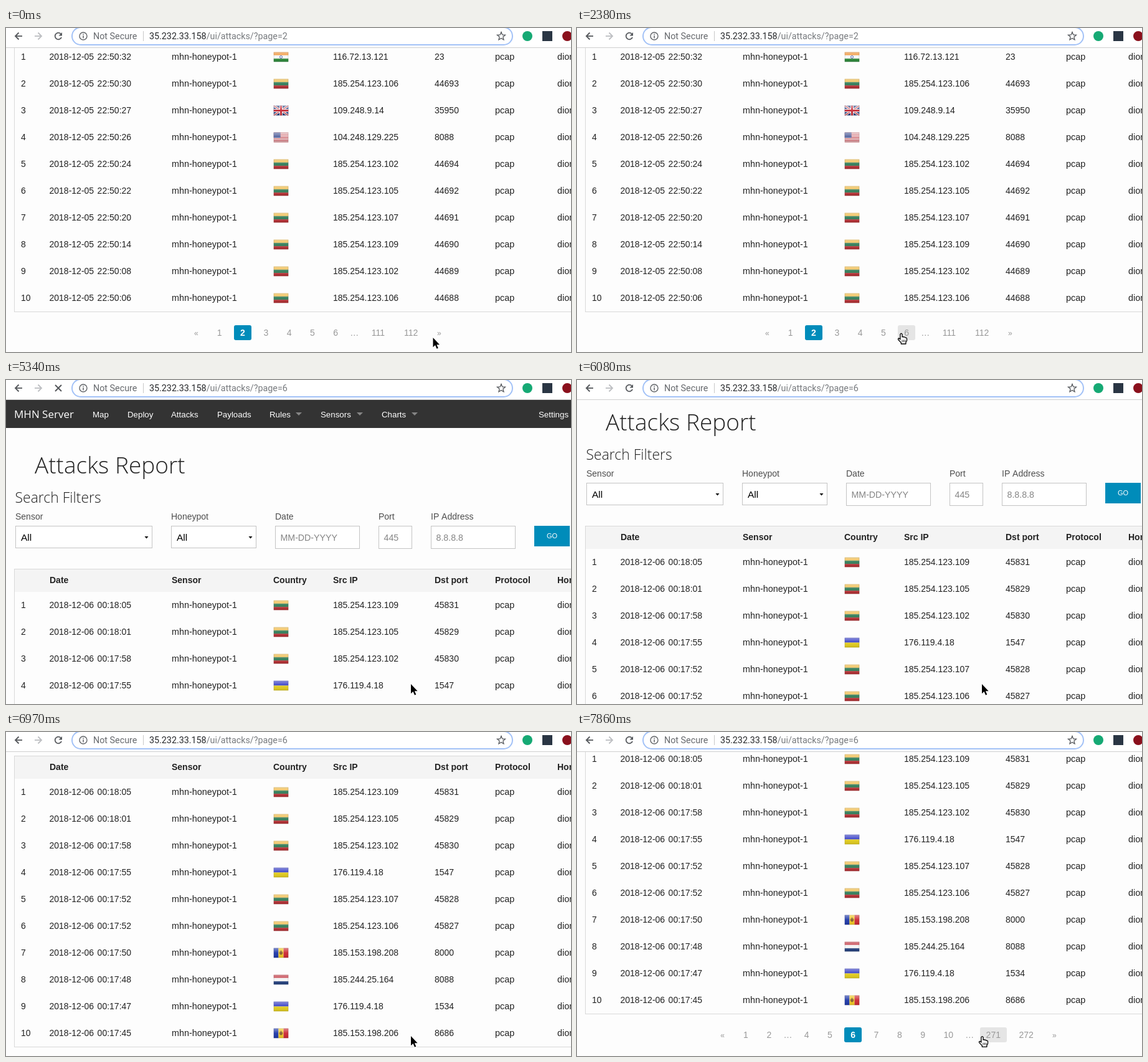
Recreate the animation shown at these times as an HTML page with a canvas. Size 907 by 520 pixels, loop 8000 ms.

```html
<!DOCTYPE html>
<html lang="en">
<head>
<meta charset="utf-8">
<title>Attacks Report</title>
<style>
html, body { margin: 0; width: 100%; height: 100%; overflow: hidden; background: #fdfdfd; }
canvas { display: block; width: 907px; height: 520px; }
</style>
</head>
<body>
<canvas id="stage"></canvas>
<script>
const W = 907, H = 520, LOOP = 8000;
const canvas = document.getElementById('stage');
const ctx = canvas.getContext('2d');
const dpr = window.devicePixelRatio || 1;
canvas.width = W * dpr;
canvas.height = H * dpr;

const SANS = '"Liberation Sans", Arial, sans-serif';
const OPEN = '"Open Sans", sans-serif';
const BAR = 'Roboto, sans-serif';
const BLUE = '#008cba';

// Each row: time, country, source address, port
const ATTACKS = {
  2: { day: '2018-12-05', hour: '22:50:', rows: [
    ['32', 'in', '116.72.13.121', '23'],
    ['30', 'lt', '185.254.123.106', '44693'],
    ['27', 'gb', '109.248.9.14', '35950'],
    ['26', 'us', '104.248.129.225', '8088'],
    ['24', 'lt', '185.254.123.102', '44694'],
    ['22', 'lt', '185.254.123.105', '44692'],
    ['20', 'lt', '185.254.123.107', '44691'],
    ['14', 'lt', '185.254.123.109', '44690'],
    ['08', 'lt', '185.254.123.102', '44689'],
    ['06', 'lt', '185.254.123.106', '44688']],
    left: 291.5, pages: '« 1 2 3 4 5 6 … 111 112 »'.split(' ') },
  6: { day: '2018-12-06', hour: '00:1', rows: [
    ['8:05', 'lt', '185.254.123.109', '45831'],
    ['8:01', 'lt', '185.254.123.105', '45829'],
    ['7:58', 'lt', '185.254.123.102', '45830'],
    ['7:55', 'ua', '176.119.4.18', '1547'],
    ['7:52', 'lt', '185.254.123.107', '45828'],
    ['7:52', 'lt', '185.254.123.106', '45827'],
    ['7:50', 'md', '185.153.198.208', '8000'],
    ['7:48', 'nl', '185.244.25.164', '8088'],
    ['7:47', 'ua', '176.119.4.18', '1534'],
    ['7:45', 'md', '185.153.198.206', '8686']],
    left: 219.8, pages: '« 1 2 … 4 5 6 7 8 9 10 … 271 272 »'.split(' ') }
};

// Step timelines: [start, value...]
const SCROLL = [[0, 315], [5340, 0], [6080, 69], [6220, 112], [6670, 132], [6820, 204],
  [6970, 265], [7110, 292], [7410, 309], [7560, 317], [7860, 318]];
const HOVER = [[0, ''], [2380, '6'], [3710, ''], [3860, '111'], [4150, ''], [4300, '112'],
  [5340, ''], [7860, '271']];
const CURSOR = [[0, 685.5, 497], [150, 691, 495], [300, 688, 500], [450, 670, 506],
  [600, 645, 511], [740, 620, 516], [890, 620, 540],
  [1190, 545, 511], [1340, 530, 498], [1480, 516, 488], [1630, 509, 487], [1780, 519, 491],
  [2380, 520.5, 490], [3420, 523, 490], [3570, 536, 490], [3710, 556, 490], [3860, 578, 487],
  [4000, 599, 485], [4150, 620, 487], [4300, 640, 487], [4440, 650, 487.5],
  [4890, 650, 488], [7860, 650.5, 488.3]];

function at(steps, t) {
  let cur = steps[0];
  for (const s of steps) if (s[0] <= t) cur = s;
  return cur;
}

function text(str, x, y, size, color, family = SANS, weight = 400, align = 'left') {
  ctx.font = `${weight} ${size}px ${family}`;
  ctx.fillStyle = color;
  ctx.textAlign = align;
  ctx.fillText(str, x, y);
}

function rect(x, y, w, h, color) {
  ctx.fillStyle = color;
  ctx.fillRect(x, y, w, h);
}

function frame(x, y, w, h, color) {
  ctx.strokeStyle = color;
  ctx.lineWidth = 1;
  ctx.strokeRect(x + 0.5, y + 0.5, w - 1, h - 1);
}

function disc(x, y, r, color) {
  ctx.fillStyle = color;
  ctx.beginPath();
  ctx.arc(x, y, r, 0, 7);
  ctx.fill();
}

function pill(x, y, w, h, color) {
  ctx.fillStyle = color;
  ctx.beginPath();
  ctx.roundRect(x, y, w, h, 3);
  ctx.fill();
}

function poly(points, color) {
  ctx.fillStyle = color;
  ctx.beginPath();
  points.forEach(([x, y]) => ctx.lineTo(x, y));
  ctx.closePath();
  ctx.fill();
}

function line(points, color, width) {
  ctx.strokeStyle = color;
  ctx.lineWidth = width;
  ctx.beginPath();
  points.forEach(([x, y], i) => i ? ctx.lineTo(x, y) : ctx.moveTo(x, y));
  ctx.stroke();
}

const caret = (x, y, r, h, color) => poly([[x - r, y], [x + r, y], [x, y + h]], color);

// Flags, drawn in a 24 x 16 box
const bands = (...colors) => colors.forEach((c, i) =>
  rect(0, i * 16 / colors.length, 24, 16 / colors.length, c));

const FLAGS = {
  lt: () => bands('#efb73e', '#2f7a55', '#b52f33'),
  nl: () => bands('#c0303c', '#f4f4f4', '#24417f'),
  ua: () => bands('#3038c4', '#e3cd1c'),
  in() {
    bands('#ee8d2c', '#f6f6f6', '#2c8a3a');
    ctx.strokeStyle = '#3c50a8';
    ctx.lineWidth = 1;
    ctx.beginPath();
    ctx.arc(12, 8, 2, 0, 7);
    ctx.stroke();
  },
  md() {
    ['#1c36a8', '#f0c820', '#cc2630'].forEach((c, i) => rect(i * 8, 0, 8, 16, c));
    disc(12, 8, 2.8, '#96692f');
    rect(11.3, 4, 1.4, 7, '#7a5526');
  },
  gb() {
    rect(0, 0, 24, 16, '#20387c');
    for (const [c, w] of [['#f2f2f2', 3.4], ['#c52b38', 1.2]]) {
      line([[0, 0], [24, 16]], c, w);
      line([[24, 0], [0, 16]], c, w);
    }
    for (const [c, w] of [['#f2f2f2', 5], ['#c52b38', 3]]) {
      rect(12 - w / 2, 0, w, 16, c);
      rect(0, 8 - w / 2, 24, w, c);
    }
  },
  us() {
    for (let i = 0; i < 13; i++) rect(0, i * 16 / 13, 24, 16 / 13, i % 2 ? '#f2eeee' : '#c4343e');
    rect(0, 0, 11, 8.6, '#33468c');
    for (let i = 0; i < 12; i++) rect(1.2 + i % 4 * 2.5, 1.2 + Math.floor(i / 4) * 2.6, 1, 1, '#c5cbe2');
  }
};

function flag(code, x, y) {
  ctx.save();
  ctx.translate(x, y);
  ctx.beginPath();
  ctx.rect(0, 0, 24, 16);
  ctx.clip();
  FLAGS[code]();
  const gloss = ctx.createLinearGradient(0, 0, 0, 16);
  gloss.addColorStop(0, 'rgba(255,255,255,.45)');
  gloss.addColorStop(0.5, 'rgba(255,255,255,.06)');
  gloss.addColorStop(1, 'rgba(0,0,0,.1)');
  rect(0, 0, 24, 16, gloss);
  frame(0, 0, 24, 16, 'rgba(0,0,0,.13)');
  ctx.restore();
}

function drawNav() {
  rect(0, 32, W, 45, '#333');
  text('MHN Server', 13, 61, 17, '#fff', OPEN);
  const items = [['Map', 139], ['Deploy', 195], ['Attacks', 265], ['Payloads', 339],
    ['Rules', 423, 470], ['Sensors', 505, 568], ['Charts', 603, 656], ['Settings', 855]];
  for (const [name, x, arrow] of items) {
    text(name, x, 59.5, 13.3, '#fff');
    if (arrow) caret(arrow, 52, 5, 5, '#858585');
  }
}

function drawFilters() {
  text('Attacks Report', 46, 150, 37, '#222', OPEN, 300);
  text('Search Filters', 14.5, 197, 23, '#222', OPEN, 300);
  const fields = [['Sensor', 15, 220], ['Honeypot', 265, 137],
    ['Date', 432, 136, 'MM-DD-YYYY'], ['Port', 598, 54, '445'], ['IP Address', 682, 136, '8.8.8.8']];
  for (const [label, x, w, hint] of fields) {
    text(label, x, 224, 14, '#4d4d4d');
    rect(x, 234, w, hint ? 37 : 36, '#fff');
    frame(x, 234, w, hint ? 37 : 36, '#c4c4c4');
    if (hint) {
      text(hint, x + 8.5, 258, 14.2, '#858585');
    } else {
      text('All', x + 9, 258, 15.5, '#000');
      caret(x + w - 9.5, 251, 3, 3.5, '#000');
    }
  }
  rect(848, 234, 57, 33, BLUE);
  text('GO', 876.5, 254, 11, '#fff', SANS, 400, 'center');
}

function drawTable({ day, hour, rows }) {
  rect(13, 303, W, 468, '#d9d9d9');
  rect(14, 304, W, 36, '#f4f4f4');
  rect(14, 340, W, 430, '#fdfdfd');
  const heads = [['Date', 70], ['Sensor', 266], ['Country', 429], ['Src IP', 525],
    ['Dst port', 688], ['Protocol', 785], ['Honeypot', 885]];
  for (const [name, x] of heads) text(name, x, 326, 14, '#222', SANS, 700);
  rows.forEach(([time, country, ip, port], i) => {
    const y = 366 + i * 43;
    const numbers = [[i + 1, 24], [day, 69.5], [hour + time, 146.6], [ip, 525], [port, 688]];
    const words = [['mhn-honeypot-1', 266], ['pcap', 785], ['dionaea', 885]];
    for (const [str, x] of numbers) text(str, x, y, 14, '#222');
    for (const [str, x] of words) text(str, x, y, 14.4, '#222');
    flag(country, 429.5, y - 12.5);
  });
}

function drawPages({ left, pages }, active, hover, focus) {
  let x = left;
  for (const p of pages) {
    const w = p === '…' ? 13.5 : 20 + 7.8 * p.length;
    const px = Math.round(x), pw = Math.round(w);
    const on = p === active, focused = p === focus;
    if (on) pill(px, 792, pw, 24, BLUE);
    else if (focused) rect(px, 792, pw, 24, '#e0e0e0');
    else if (p === hover) pill(px, 792, pw, 24, '#e5e5e5');
    if (focused) {
      ctx.setLineDash([1, 1]);
      frame(px - 1, 791, pw + 1, 26, '#777');
      ctx.setLineDash([]);
    }
    const size = /[«»]/.test(p) ? 12 : 14;
    text(p, x + w / 2, 809, size, on ? '#fff' : '#999', SANS, on ? 700 : 400, 'center');
    x += w + 9.5;
  }
}

function drawToolbar(page, loading) {
  const ink = '#55585c';
  rect(0, 0, W, 31, '#fff');
  rect(0, 31, W, 1, '#cfcfcf');
  for (const [x, d, color] of [[20, 1, ink], [52, -1, '#bdbfc2']]) {
    line([[x - 5 * d, 13], [x + 6 * d, 13]], color, 1.8);
    line([[x + 0.5 * d, 7.5], [x - 5 * d, 13], [x + 0.5 * d, 18.5]], color, 1.8);
  }
  if (loading) {
    line([[79, 8], [89, 18]], ink, 2);
    line([[89, 8], [79, 18]], ink, 2);
  } else {
    ctx.strokeStyle = ink;
    ctx.lineWidth = 1.8;
    ctx.beginPath();
    ctx.arc(84, 13, 5.3, 0.35, 5.5);
    ctx.stroke();
    poly([[90, 7], [90, 12.5], [84.5, 12.5]], ink);
  }

  ctx.strokeStyle = '#a3c2f7';
  ctx.lineWidth = 2;
  ctx.beginPath();
  ctx.roundRect(106, -1, 707, 28, 14);
  ctx.stroke();
  ctx.strokeStyle = '#606367';
  ctx.lineWidth = 1.4;
  ctx.beginPath();
  ctx.arc(124, 13, 6, 0, 7);
  ctx.stroke();
  rect(123.3, 12, 1.5, 4.5, '#606367');
  rect(123.3, 9.3, 1.5, 1.6, '#606367');
  text('Not Secure', 140, 18, 14.3, '#66696d', BAR);
  rect(220, 5, 1, 16, '#c8c8c8');
  const host = '35.232.33.158';
  text(host, 230, 18, 14.3, '#26282b', BAR);
  text('/ui/attacks/?page=' + page, 230 + ctx.measureText(host).width, 18, 14.3, '#777a7e', BAR);

  const star = [];
  for (let i = 0; i < 10; i++) {
    const a = i * Math.PI / 5, r = i % 2 ? 3 : 6.8;
    star.push([795 + r * Math.sin(a), 13.4 - r * Math.cos(a)]);
  }
  line([...star, star[0], star[1]], ink, 1.3);
  disc(837, 13, 8, '#16a974');
  rect(861, 5, 16, 16, '#2a3644');
  disc(901, 13, 8, '#8a101c');
}

const ARROW = new Path2D('M0 0V15.2L3.5 12L6 17.8L8.3 16.8L5.9 11.2H10.6Z');
const HAND = new Path2D('M-1.6 1.5Q0-1 1.6 1.5V6Q3.1 4.7 4.2 6.3Q5.8 5.3 6.8 7.1Q8.7 6.5 9 8.6' +
  'V11.8L7.4 14.5V17H-.2V15L-4.8 10.3Q-5.5 8 -3.6 8L-1.6 9.8Z');

function drawCursor(t) {
  const [, x, y] = at(CURSOR, t);
  const hand = at(HOVER, t)[1] && !(t >= 4890 && t < 5340);
  ctx.save();
  ctx.translate(x, y);
  ctx.lineJoin = 'round';
  if (hand) {
    ctx.fillStyle = '#fff';
    ctx.fill(HAND);
    ctx.strokeStyle = '#000';
    ctx.lineWidth = 1.3;
    ctx.stroke(HAND);
    for (const lx of [1.6, 4, 6.4]) line([[lx, 10.5], [lx, 14]], '#000', 0.9);
  } else {
    ctx.strokeStyle = '#fff';
    ctx.lineWidth = 2;
    ctx.stroke(ARROW);
    ctx.fillStyle = '#000';
    ctx.fill(ARROW);
  }
  ctx.restore();
}

function draw(t) {
  const page = t < 5340 ? '2' : '6';
  const data = ATTACKS[page];
  const focus = t >= 3420 && t < 5340 ? '6' : '';
  ctx.setTransform(dpr, 0, 0, dpr, 0, 0);
  rect(0, 0, W, H, '#fdfdfd');
  ctx.save();
  ctx.translate(0, -at(SCROLL, t)[1]);
  drawNav();
  drawFilters();
  drawTable(data);
  drawPages(data, page, at(HOVER, t)[1], focus);
  ctx.restore();
  drawToolbar(t < 4590 ? '2' : '6', t >= 2820 && t < 5630);
  drawCursor(t);
}

const start = performance.now();
function tick() {
  draw((performance.now() - start) % LOOP);
  requestAnimationFrame(tick);
}
tick();
</script>
</body>
</html>
```
